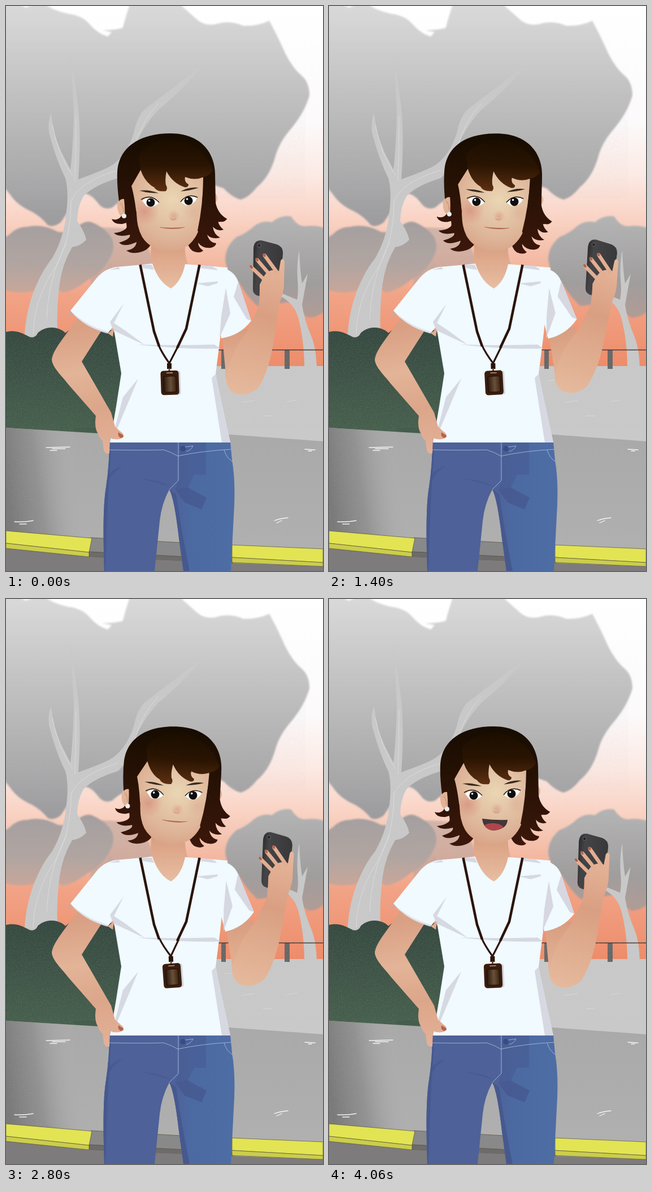
Write an HTML page that moves like this. It is 561 px wide and 998 px high and loops after 4200 ms.

```html
<!DOCTYPE html>
<html lang="en">
<head>
<meta charset="utf-8">
<title>Talking by the road</title>
<style>
html, body { margin: 0; width: 100%; height: 100%; overflow: hidden; background: #fff; }
svg { position: absolute; left: 0; top: 0; width: 100%; height: 100%; display: block; }
</style>
</head>
<body>
<svg viewBox="0 0 561 998" preserveAspectRatio="none">
  <defs>
    <linearGradient id="sky" x2="0" y2="1">
      <stop offset="0" stop-color="#fff"/><stop offset=".32" stop-color="#fcfafa"/>
      <stop offset=".47" stop-color="#fce9e3"/><stop offset=".64" stop-color="#f8c9b6"/>
      <stop offset=".8" stop-color="#f4a284"/><stop offset="1" stop-color="#ef8a66"/>
    </linearGradient>
    <linearGradient id="crown" gradientUnits="userSpaceOnUse" x1="0" y1="0" x2="0" y2="385">
      <stop offset="0" stop-color="#d9d9d9"/><stop offset=".45" stop-color="#bebebe"/><stop offset="1" stop-color="#9c9c9e"/>
    </linearGradient>
    <linearGradient id="midTree" x2="0" y2="1">
      <stop offset="0" stop-color="#a39e9e"/><stop offset=".6" stop-color="#b0a4a0"/><stop offset="1" stop-color="#c9a598"/>
    </linearGradient>
    <linearGradient id="rightTree" x2="0" y2="1">
      <stop offset="0" stop-color="#b4b4b4"/><stop offset=".65" stop-color="#9f9c9c"/><stop offset="1" stop-color="#b09a94"/>
    </linearGradient>
    <linearGradient id="bush" x2="0" y2="1">
      <stop offset="0" stop-color="#33473e"/><stop offset="1" stop-color="#465f4c"/>
    </linearGradient>
    <linearGradient id="shade" gradientUnits="userSpaceOnUse" x1="0" y1="850" x2="125" y2="832">
      <stop offset="0" stop-color="#787878"/><stop offset=".45" stop-color="#8a8a8a" stop-opacity=".8"/><stop offset="1" stop-color="#acacac" stop-opacity="0"/>
    </linearGradient>
    <linearGradient id="road" x2="0" y2="1">
      <stop offset="0" stop-color="#a9a9a9"/><stop offset="1" stop-color="#b1b1b1"/>
    </linearGradient>
    <filter id="soft" x="-5%" y="-5%" width="110%" height="110%"><feGaussianBlur stdDeviation="1.8"/></filter>
    <filter id="grain" x="0" y="0" width="100%" height="100%">
      <feTurbulence type="fractalNoise" baseFrequency=".8" numOctaves="2" seed="4"/>
      <feColorMatrix values="0 0 0 0 .5  0 0 0 0 .5  0 0 0 0 .5  0 0 0 1.6 -.72"/>
      <feComposite in2="SourceGraphic" operator="in"/>
    </filter>
  </defs>
  <rect width="561" height="640" fill="url(#sky)"/>
  <g filter="url(#soft)">
    <path fill="#b9a39b" opacity=".6" d="M150 392Q185 390 215 394Q250 410 262 455Q230 462 205 470Q170 468 150 500Z"/>
    <path fill="url(#midTree)" d="M-8 410Q2 408 8 402Q20 390 38 390Q65 384 92 399Q115 402 125 392Q138 378 152 382Q172 390 184 405Q196 424 184 445Q172 470 145 484Q118 505 100 506Q80 494 60 500Q25 512-8 500Z"/>
    <path d="M186 455Q165 505 112 545" fill="none" stroke="#c9a99d" stroke-width="7"/>
    <path fill="url(#rightTree)" d="M388 448Q388 425 408 408Q425 402 440 388Q455 378 470 382Q488 368 505 372Q516 390 530 389Q550 386 570 394V533Q552 552 535 550Q518 542 512 522Q475 526 445 530Q425 512 412 488Q392 478 388 448Z"/>
    <path fill="url(#crown)" d="M-8-8Q20-6 35 3L62-8Q84 10 118 15Q136 19 146 30Q158 44 170 50L180 54L187 46L170 43Q200 42 207 38Q211 20 221-8H302Q318 6 338 24Q352 36 372 32Q395 24 420 35Q445 36 466 26Q478 48 488 70Q502 104 522 122Q537 134 537 158Q528 190 500 222Q482 244 476 268Q466 302 444 320Q430 338 415 342Q400 338 385 322Q310 295 250 320Q205 340 188 356Q172 362 162 347Q145 325 130 334Q115 355 97 382Q84 392 74 387Q62 372 45 363Q20 352 8 334L-8 314Z"/>
  </g>
  <g fill="#c9c9c9">
    <path d="M32 595Q34 535 55 490Q66 465 82 445Q102 410 106 370Q112 330 105 304Q88 270 76 223Q74 200 80 190Q84 230 100 262L114 289Q119 245 120 190Q118 135 113 75Q122 130 128 180Q133 235 128 306Q162 294 181 285Q211 270 226 225Q232 195 246 182Q300 142 352 100Q320 142 270 183Q247 207 231 240Q222 282 198 304Q155 317 137 336Q126 356 126 380Q140 400 142 413Q132 424 117 426Q100 455 95 490Q88 540 92 595Z"/>
    <path d="M528 641Q528 590 517 550Q510 525 486 513L489 508Q509 516 515 519Q518 505 516 485Q514 455 519 431Q520 465 524 490L534 473Q528 505 524 528Q528 555 541 585Q549 605 550 641Z"/>
  </g>
  <g fill="none" stroke="#e0e0e0" stroke-width=".8">
    <path d="M48 580Q50 520 82 470Q115 420 115 345Q130 310 198 290M72 553Q75 480 107 418M82 210Q91 260 118 300M124 195Q124 250 122 310M227 253Q238 205 270 172"/>
  </g>
  <path fill="#c9c9c9" d="M360 636H561V775H360Z"/>
  <g fill="#666"><path d="M381 607H389V641H381ZM493 607H502V641H493Z"/></g>
  <path d="M372 607.500H561" stroke="#403735" stroke-width="1.3"/>
  <path fill="url(#bush)" stroke="#24352c" stroke-width=".6" d="M0 576Q16 572 32 580L42 585Q52 588 57 577Q70 566 88 569Q100 572 105 578Q118 566 136 569Q150 572 157 582Q175 568 190 574L220 640V760H0Z"/>
  <path fill="url(#road)" d="M0 745L200 757L397 757L561 769V998H0Z"/>
  <path fill="url(#shade)" d="M0 745L180 756V998H0Z"/>
  <g stroke="#55513b" stroke-width=".7">
    <path fill="#898989" d="M150 939L402 953V978L147 964Z"/>
    <path fill="#6d6b6b" d="M147 964L402 977V985L147 973Z"/>
    <path fill="#7d7b7c" stroke="none" d="M0 958L147 973L400 984L561 990V998H0Z"/>
    <path fill="#e2e454" d="M0 927L152 940L147 965L0 949ZM400 952L561 959V983L400 974Z"/>
    <path fill="#cbcd4b" d="M0 949L147 965V973L0 958ZM400 974L561 983V990L400 983Z"/>
  </g>
  <g fill="none" stroke="#f4f4f4" stroke-width="1.3" stroke-linecap="round">
    <path d="M71 780L113 779M78 785H90M82 782L105 782M529 783L547 784M535 786H541M475 909Q485 905 499 904M479 913L488 909M15 911Q32 912 48 909M24 915H36"/>
    <path stroke="#dadada" stroke-width="1" d="M417 700L440 697M497 699L515 696M455 724H470M388 662L399 661"/>
  </g>
  <path filter="url(#grain)" opacity=".35" d="M0 130H530V340H0ZM0 390H561V745H0ZM0 745H120V930H0Z"/>
</svg>

<svg viewBox="0 0 561 998" preserveAspectRatio="none">
  <defs>
    <linearGradient id="hair" gradientUnits="userSpaceOnUse" x1="0" y1="225" x2="0" y2="435">
      <stop offset="0" stop-color="#160c00"/><stop offset=".4" stop-color="#251104"/><stop offset="1" stop-color="#3c170b"/>
    </linearGradient>
    <linearGradient id="bangs" gradientUnits="userSpaceOnUse" x1="0" y1="235" x2="0" y2="328">
      <stop offset="0" stop-color="#1a0e00"/><stop offset=".5" stop-color="#2a1402"/><stop offset="1" stop-color="#5e3012"/>
    </linearGradient>
    <radialGradient id="face" gradientUnits="userSpaceOnUse" cx="295" cy="342" r="92">
      <stop offset="0" stop-color="#ead6b2"/><stop offset=".35" stop-color="#e4c6a8"/><stop offset=".75" stop-color="#deb498"/><stop offset="1" stop-color="#d9a68a"/>
    </radialGradient>
    <radialGradient id="blush">
      <stop offset="0" stop-color="#d07f72" stop-opacity=".55"/><stop offset="1" stop-color="#d98577" stop-opacity="0"/>
    </radialGradient>
    <linearGradient id="neck" x2="0" y2="1">
      <stop offset="0" stop-color="#d79b7c"/><stop offset=".35" stop-color="#dda689"/><stop offset="1" stop-color="#e8bfa3"/>
    </linearGradient>
    <linearGradient id="leftArm" gradientUnits="userSpaceOnUse" x1="150" y1="565" x2="185" y2="785">
      <stop offset="0" stop-color="#d9a084"/><stop offset=".35" stop-color="#e3b498"/><stop offset=".65" stop-color="#dca68a"/><stop offset="1" stop-color="#e3b096"/>
    </linearGradient>
    <linearGradient id="foreArm" gradientUnits="userSpaceOnUse" x1="480" y1="450" x2="415" y2="690">
      <stop offset="0" stop-color="#e6b69b"/><stop offset=".4" stop-color="#d99f82"/><stop offset="1" stop-color="#e6ba9d"/>
    </linearGradient>
    <linearGradient id="upperArm" x2="0" y2="1">
      <stop offset="0" stop-color="#d89d80"/><stop offset="1" stop-color="#e6ba9d"/>
    </linearGradient>
    <linearGradient id="jeans" gradientUnits="userSpaceOnUse" x1="175" y1="0" x2="405" y2="0">
      <stop offset="0" stop-color="#4e6299"/><stop offset=".52" stop-color="#4e6198"/><stop offset=".66" stop-color="#4c6aa2"/><stop offset="1" stop-color="#4e6da5"/>
    </linearGradient>
    <linearGradient id="card"><stop offset="0" stop-color="#2a190f"/><stop offset=".55" stop-color="#695039"/><stop offset="1" stop-color="#3b2415"/></linearGradient>
    <linearGradient id="phone" x2="1" y2=".2"><stop offset="0" stop-color="#29292b"/><stop offset=".25" stop-color="#444447"/><stop offset="1" stop-color="#38383a"/></linearGradient>
    <clipPath id="lips"><path d="M271 388Q294 391 316 390Q315 407 291 409Q273 407 271 388Z"/></clipPath>
  </defs>

  <g class="head" fill="url(#hair)">
    <path d="M205 300V355Q208 374 196 377Q191 378 187 376Q190 386 206 385L216 382Q217 398 191 401Q199 409 219 404Q222 411 200 418Q209 427 231 417Q230 429 213 432Q224 440 243 433Q253 429 259 417L320 400Q318 424 331 433Q343 438 349 432Q340 426 340 418Q348 429 363 427Q371 425 372 419Q360 418 356 404Q364 413 379 409Q368 404 366 390Q375 399 385 395Q377 389 375 380Q386 384 391 376Q375 371 370 345V300Z"/>
  </g>

  <path fill="url(#jeans)" d="M183 770H397L400 802Q407 842 403 900L398 998H314L306 940Q298 870 289 854Q275 880 272 910L263 998H174Q170 890 177 850Q183 810 183 770Z"/>
  <g fill="#46598f">
    <path d="M183 770L186 785L180 880L176 998H174Q170 890 177 850Q183 810 183 770Z"/>
    <path d="M180 830Q190 816 208 812Q190 821 181 840ZM238 835Q275 838 291 849Q272 843 238 835Z" opacity=".7"/>
    <path d="M289 854L301 862Q311 930 325 998H314L306 940Q298 870 289 854Z"/>
    <path d="M306 771H354V828H333L322 850L355 868L346 889L316 877L300 855L306 836Z" opacity=".5"/>
    <path d="M300 855L319 850L355 869L346 889L316 877Z" opacity=".6"/>
  </g>
  <g fill="none" stroke="#a9b7dc" stroke-width=".9">
    <path d="M183 784Q240 785 279 784Q293 788 304 795Q345 786 399 783M305 770V838L289 854M317 779L331 777Q327 785 319 787M386 784Q390 798 401 805"/>
  </g>
  <circle cx="313" cy="782" r="5" fill="#374d88"/>

  <path fill="url(#neck)" d="M257 408H317Q315 440 322 456Q313 487 292 501Q272 491 256 457Z"/>

  <path fill="#f0faff" d="M240 457L195 461Q174 464 160 481L114 538Q136 566 180 578L190 566L204 649Q195 710 184 771H397Q381 700 371 650L379 587L392 462L344 458L317 456Q311 486 292 499Q270 488 259 455Z"/>
  <g fill="#d6d8e2">
    <path d="M208 526L184 558L190 573L246 599L212 574L191 560Z"/>
    <path d="M116 540Q145 566 180 575V579Q135 567 116 540Z" opacity=".6"/>
    <path d="M232 598Q300 600 369 598L379 605Q310 607 232 598Z"/>
    <path d="M234 658L207 691L187 768L197 746Z"/>
    <path d="M371 650L364 657L382 771H397Q381 700 371 650Z"/>
    <path d="M237 457H258L262 466L243 463ZM344 458L365 460L377 467L345 463ZM336 490L390 485L357 495Z"/>
    <path d="M199 461L183 466L202 465Z"/>
  </g>

  <path fill="url(#leftArm)" d="M126 551C106 583 83 606 81 625C83 640 99 653 110 668L159 724Q156 744 162 754Q166 765 171 768L173 785Q177 793 183 790L184 763Q196 768 206 763Q211 757 203 752L193 743L186 718L134 628Q150 603 168 575Q145 568 126 551Z"/>
  <path d="M199 753L207 758Q210 762 203 763Q197 760 199 753Z" fill="#b4624c"/>
  <path d="M180 578L191 570L189 584Z" fill="#e0ad92"/>

  <g id="arm">
    <path fill="url(#upperArm)" d="M382 575L388 640Q386 672 406 682L442 650L430 570Z"/>
    <g id="fore">
      <path fill="url(#phone)" d="M438 428Q439 413 452 414L479 421Q491 425 490 438L484 505Q482 516 470 515L447 512Q437 510 437 500Z"/>
      <circle cx="448" cy="423" r="3" fill="#232325" stroke="#77777a" stroke-width=".8"/>
      <path fill="url(#foreArm)" d="M449 492Q449 525 446 534L427 575Q402 605 394 640Q382 664 400 682Q423 694 447 674Q467 640 474 590L484 525Q493 503 492 485L493 451Q490 443 486 450L483 468Q466 462 456 478Z"/>
      <g fill="none" stroke="#e2ae92" stroke-width="6.500" stroke-linecap="round">
        <path d="M435 462L460 486M445 449L468 476M458 441L480 471"/>
      </g>
      <g fill="#b5614c">
        <ellipse cx="434" cy="461" rx="2.200" ry="3.400" transform="rotate(-35 434 461)"/>
        <ellipse cx="444" cy="448" rx="2.200" ry="3.400" transform="rotate(-35 444 448)"/>
        <ellipse cx="457" cy="440" rx="2.200" ry="3.400" transform="rotate(-35 457 440)"/>
      </g>
    </g>
    <path fill="#f0faff" d="M374 461Q403 464 411 487L434 556Q414 582 381 587L376 560Z"/>
    <path fill="#d6d7e1" d="M389 498L381 548L378 586L397 543ZM411 487L434 556L426 553L403 514Z"/>
  </g>

  <path d="M237.500 457L262 575L271 601M342.500 457L319 570L303 604" fill="none" stroke="#2a1409" stroke-width="4.500"/>
  <g id="tag">
    <path d="M270 599Q276 613 289 631M304 602L289 631" fill="none" stroke="#2a1409" stroke-width="3.200"/>
    <path d="M285 631H293V641H285Z" fill="#2a1409"/>
    <path d="M289 640V650" stroke="#6a4b35" stroke-width="3"/>
    <g transform="rotate(-2 290 665)">
      <rect x="277" y="645" width="32" height="42" rx="4" fill="#d3d5dd"/>
      <rect x="274" y="644" width="32" height="43" rx="5" fill="#3a1c0d"/>
      <rect x="279" y="654" width="22" height="28" rx="3" fill="url(#card)" stroke="#1d0f06"/>
      <path d="M285 648H295" stroke="#b99b82" stroke-width="1.6" stroke-linecap="round"/>
    </g>
  </g>

  <g class="head">
    <path fill="#e2b497" d="M212 341Q196 338 197 354Q198 372 211 374ZM366 329Q375 331 374 341Q372 350 367 352Z"/>
    <path d="M202 348Q208 352 208 364" fill="none" stroke="#c08b70"/>
    <path fill="url(#face)" d="M220 318L238 284H345L350 305L345 380Q341 408 321 424Q304 434 285 433Q255 430 241 408Q231 390 231 365Z"/>
    <circle cx="246" cy="363" r="25" fill="url(#blush)"/>
    <circle cx="331" cy="362" r="18" fill="url(#blush)" opacity=".3"/>
    <circle cx="297" cy="371" r="11" fill="url(#blush)" opacity=".8"/>
    <path d="M291 375Q296 380 301 375" fill="none" stroke="#d48f6d" stroke-width="1.1"/>
    <g fill="#38291b">
      <path d="M236 326Q255 324 270 330.500Q252 331 236 326ZM309 327.500Q324 319 341 321Q326 326 309 327.500Z"/>
    </g>
    <g fill="#fff">
      <path d="M241 344Q256 332 271 347Q263 357 249 354Z"/>
      <path d="M309 346Q321 330 338 339Q334 351 318 352Z"/>
    </g>
    <path d="M239 342Q256 331 271 347M309 346Q321 330 339 338" fill="none" stroke="#19100c" stroke-width="1.400"/>
    <g fill="#0f0d0d"><circle cx="256" cy="347" r="7.5"/><circle cx="323" cy="344" r="7.5"/></g>
    <g fill="#fff"><circle cx="253.500" cy="344" r="1.8"/><circle cx="320.500" cy="341" r="1.8"/></g>
    <path id="shut" d="M272 391Q292 393 316 391Q296 396 272 391Z" fill="#a95a42" stroke="#a95a42" stroke-width=".4"/>
    <g id="open" clip-path="url(#lips)">
      <rect x="268" y="384" width="52" height="28" fill="#43363a"/>
      <ellipse cx="290" cy="405" rx="19" ry="9" fill="#b0454c"/>
    </g>
    <path fill="url(#hair)" d="M200 345Q196 315 197 292C200 247 240 225 291 225C344 225 369 258 370 296L371 348Q375 367 391 376Q378 385 368 379L360 394Q347 407 339 397Q349 350 349 303L318 280L238 290L222 318Q231 350 233 400Q220 408 213 398Q215 385 210 374Q211 360 209 341Q204 340 200 345Z"/>
    <path fill="url(#bangs)" d="M235 265Q250 238 295 235Q350 245 366 290Q360 300 350 302Q334 309 317 302Q315 311 323 315Q323 321 316 320Q295 313 284 292Q281 307 283 316Q287 322 283 327Q267 329 262 320Q246 312 238 289Z"/>
    <circle cx="209" cy="371" r="4" fill="#e8eff1"/>
  </g>
</svg>

<script>
const STEP = 140, STEPS = 30;
// Sparse [step, degrees] keys for each joint.
const keys = {
  head: [[0, 0], [1, 1.2], [3, 3.5], [5, 4.2], [8, 3.8], [10, 2.5], [12, -1], [14, -3.2], [15, -3.2], [16, 0], [18, 2.5], [20, 4], [23, 4.3], [26, 3.8], [28, -3.2], [29, 0], [30, 0]],
  shoulder: [[0, 0], [3, 4.4], [10, 4], [14, 0], [16, 0], [19, 4.2], [26, 4.2], [29, 0], [30, 0]],
  fore: [[0, 0], [3, 0], [4, 1.6], [7, 10], [8, 8.2], [10, 2.5], [14, 0], [16, 0], [19, .3], [20, 1.5], [23, 10], [24, 9], [26, 3.6], [29, 1.1], [30, 0]],
  tag: [[0, 0], [3, 3.2], [6, 2.4], [10, 1.1], [14, 0], [16, 0], [20, 2.2], [26, 2.8], [29, .3], [30, 0]]
};
// One digit per step: 1 is an open mouth.
const talk = "010110101101100" + "011010110101101";

const $ = id => document.getElementById(id);
const heads = document.querySelectorAll(".head");
const arm = $("arm"), fore = $("fore"), tag = $("tag"), open = $("open"), shut = $("shut");

function at(list, k) {
  const i = list.findIndex(p => p[0] > k), [a, u] = list[i - 1], [b, v] = list[i];
  return u + (v - u) * (k - a) / (b - a);
}
const turn = (el, deg, x, y) => el.setAttribute("transform", `rotate(${deg} ${x} ${y})`);

function pose(k) {
  const lift = at(keys.shoulder, k);
  heads.forEach(h => turn(h, at(keys.head, k), 288, 459));
  turn(arm, -lift, 392, 490);
  turn(fore, lift + at(keys.fore, k), 425, 645);
  turn(tag, -at(keys.tag, k), 288, 560);
  const talking = talk[k] === "1";
  open.style.display = talking ? "" : "none";
  shut.style.display = talking ? "none" : "";
}

const start = performance.now();
let shown = -1;
function tick() {
  const k = Math.floor((performance.now() - start) / STEP) % STEPS;
  if (k !== shown) pose(shown = k);
  requestAnimationFrame(tick);
}
tick();
</script>
</body>
</html>
```
